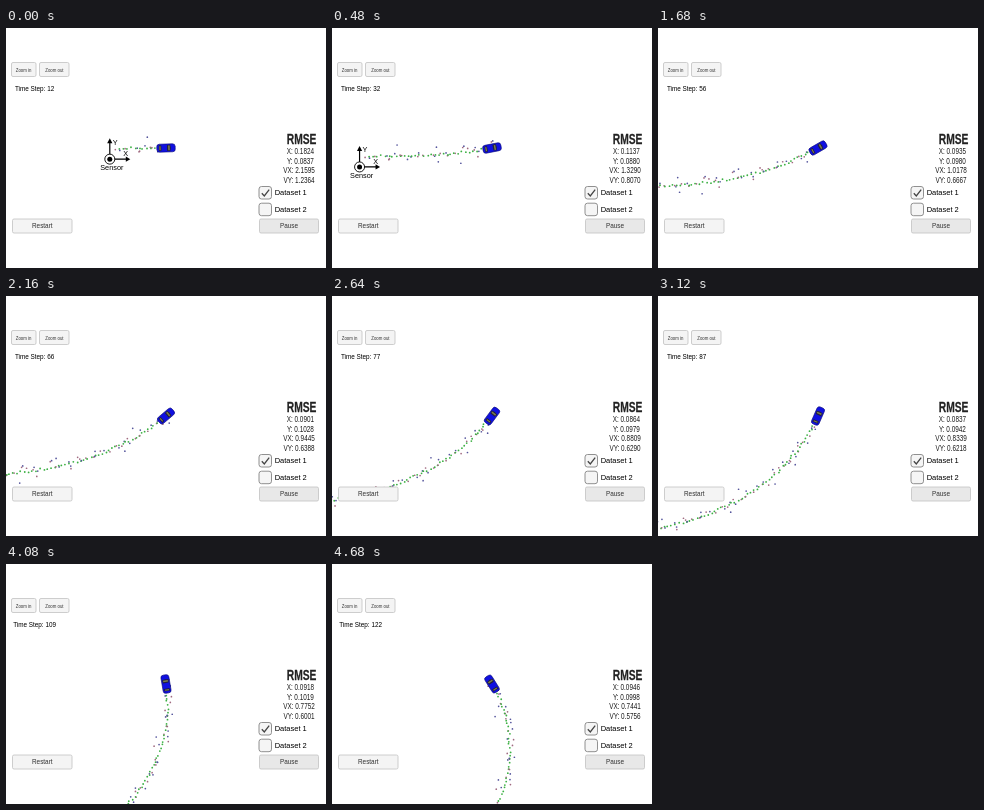
Animation of 320x240 px, one loop 4800 ms. Source, as an HTML page with a canvas:

```html
<!DOCTYPE html>
<html lang="en">
<head>
<meta charset="utf-8">
<title>Tracking simulator</title>
<style>
html, body { margin: 0; width: 100%; height: 100%; overflow: hidden; background: #fff; }
canvas, svg { position: absolute; left: 0; top: 0; width: 100vw; height: 100vh; display: block; }
text { font-family: "Liberation Sans", Arial, sans-serif; }
.mid { text-anchor: middle; }
.btn rect { fill: #f4f4f4; stroke: #c2c2c2; stroke-width: .8; }
.btn .on { fill: #e8e8e8; }
.btn text { fill: #323232; text-anchor: middle; }
.box { fill: #f5f5f5; stroke: #858585; stroke-width: .9; }
</style>
</head>
<body>
<canvas id="scene" width="320" height="240"></canvas>
<svg id="ui" viewBox="0 0 320 240">
  <g class="btn">
    <rect x="5.5" y="34.5" width="24.5" height="14" rx="1.5"/>
    <rect x="33.5" y="34.5" width="29.5" height="14" rx="1.5"/>
    <rect x="6.5" y="191" width="59.5" height="14" rx="1.5"/>
    <rect class="on" x="253.5" y="191" width="59" height="14" rx="1.5"/>
    <text transform="translate(17.6 43.8) scale(.71 1)" font-size="6.1">Zoom in</text>
    <text transform="translate(48.4 43.8) scale(.71 1)" font-size="6.1">Zoom out</text>
    <text x="36.3" y="200.4" font-size="6.4">Restart</text>
    <text x="283" y="200.4" font-size="6.4">Pause</text>
  </g>
  <text id="clock" class="mid" x="28.6" y="62.6" font-size="6.35"></text>
  <text class="mid" transform="translate(295.6 116) scale(.71 1)" font-size="14.5" font-weight="bold" fill="#222" stroke="#222" stroke-width=".25">RMSE</text>
  <g id="rows" class="mid" font-size="9" fill="#1c1c1c"></g>
  <rect class="box" x="253" y="158.5" width="12.5" height="12.5" rx="2.5"/>
  <rect class="box" x="253" y="175.2" width="12.5" height="12.5" rx="2.5"/>
  <path d="M255.8 165.2L258.3 167.9L263.2 161.6" fill="none" stroke="#444" stroke-width="1.3"/>
  <text x="268.7" y="167.3" font-size="7.5">Dataset 1</text>
  <text x="268.7" y="184" font-size="7.5">Dataset 2</text>
</svg>
<script>
const HOLD = 120, FRAMES = 40, LAST = 122, CX = 160, CY = 120;
const ctx = document.getElementById("scene").getContext("2d");
const clock = document.getElementById("clock");

// Readings at a few moments: tick, step, then the four errors
const NAMES = ["X", "Y", "VX", "VY"];
const keys = [
  [0, 12, .1824, .0837, 2.1595, 1.2364],
  [4, 32, .1137, .0880, 1.3290, .8070],
  [9, 44, .0989, .0901, 1.1368, .7121],
  [18, 66, .0901, .1028, .9445, .6388],
  [26, 87, .0837, .0942, .8339, .6218],
  [30, 99, .0893, .1037, .8031, .6222],
  [39, LAST, .0946, .0998, .7441, .5756]
];

const same = x => x;
const decay = s => 1 / Math.sqrt(s);

// Column `to` at value x of column `from`, linear in ease(x)
function read(from, to, x, ease = same) {
  const i = Math.max(1, keys.findIndex(k => k[from] >= x));
  const a = keys[i - 1], b = keys[i];
  const t = (ease(x) - ease(a[from])) / (ease(b[from]) - ease(a[from]));
  return a[to] + (b[to] - a[to]) * t;
}

// The left turn tightens with time
const heading = s => 122 * Math.pow(s / LAST, 1.8) * Math.PI / 180;

// Positions relative to the sensor, y pointing up
const path = [{ x: 9.6, y: 10.6 }];
for (let s = 0; s < LAST; s++) {
  const v = 3.9 - .003 * s, a = heading(s + .5), p = path[s];
  path.push({ x: p.x + v * Math.cos(a), y: p.y + v * Math.sin(a) });
}

let seed = 11;
const rand = () => (seed = (seed * 16807) % 2147483647) / 2147483647;
const noise = r => (rand() + rand() + rand() - 1.5) * r;

const scatter = (p, spread, color, size) =>
  ({ x: p.x + noise(spread), y: p.y + noise(spread), color, size });

// Each step leaves one estimate and one laser or radar reading
const dots = path.map((p, s) => [
  s % 2 ? scatter(p, 9, "#55559c", 1.7) : scatter(p, 5.5, "#a06a80", 1.7),
  scatter(p, 1.3, "#3cb043", 1.8)
]);

const rows = NAMES.map((name, i) => {
  const el = document.createElementNS("http://www.w3.org/2000/svg", "text");
  el.setAttribute("transform", `translate(${i < 2 ? 294.4 : 293} ${126.1 + 9.5 * i}) scale(.71 1)`);
  document.getElementById("rows").append(el);
  return el;
});

function line(...pts) {
  ctx.beginPath();
  for (let i = 0; i < pts.length; i += 2) ctx.lineTo(pts[i], pts[i + 1]);
}

function disc(x, y, r, color) {
  ctx.beginPath();
  ctx.arc(x, y, r, 0, Math.PI * 2);
  ctx.fillStyle = color;
  ctx.fill();
}

function drawSensor(x, y) {
  ctx.save();
  ctx.translate(x, y);
  ctx.fillStyle = ctx.strokeStyle = "#000";
  ctx.lineWidth = 1.2;
  line(0, -17, 0, 0, 17, 0);
  ctx.stroke();
  line(-2.6, -16, 0, -21, 2.6, -16);
  ctx.fill();
  line(16, -2.6, 20.5, 0, 16, 2.6);
  ctx.fill();
  disc(0, 0, 5, "#fff");
  ctx.lineWidth = .9;
  ctx.stroke();
  disc(0, 0, 2.5, "#000");
  ctx.font = '7.3px "Liberation Sans", Arial, sans-serif';
  ctx.textAlign = "center";
  ctx.fillText("Y", 5.3, -14.5);
  ctx.fillText("X", 16, -2.8);
  ctx.fillText("Sensor", 2, 11);
  ctx.restore();
}

function drawCar(angle) {
  ctx.save();
  ctx.translate(CX, CY);
  ctx.rotate(-angle);
  ctx.beginPath();
  ctx.roundRect(-9.2, -4, 18.4, 8, 2.6);
  ctx.fillStyle = "#1010e0";
  ctx.fill();
  ctx.strokeStyle = "#0a0a78";
  ctx.lineWidth = .6;
  ctx.stroke();
  ctx.fillStyle = "#20203c";
  line(1, -2.8, 4.2, -3.4, 4.9, 0, 4.2, 3.4, 1, 2.8);
  ctx.fill();
  line(-4.6, -2.7, -7.2, -3, -7.2, 3, -4.6, 2.7);
  ctx.fill();
  ctx.fillStyle = "#7c7c50";
  ctx.fillRect(2.2, -2.4, 1.5, 4.8);
  ctx.fillRect(-6.6, -2, 1.2, 4);
  ctx.restore();
}

function draw(now) {
  const tick = Math.floor(now / HOLD) % FRAMES;
  const step = Math.round(read(0, 1, tick));
  const car = path[step];
  const sx = x => CX + x - car.x, sy = y => CY - y + car.y;

  ctx.clearRect(0, 0, 320, 240);
  drawSensor(sx(0), sy(0));
  for (const d of dots.slice(0, step + 1).flat()) disc(sx(d.x), sy(d.y), d.size / 2, d.color);
  drawCar(heading(step));

  clock.textContent = "Time Step: " + step;
  rows.forEach((el, i) => {
    el.textContent = NAMES[i] + ": " + read(1, i + 2, step, decay).toFixed(4);
  });
}

const start = performance.now();
function loop() {
  draw(performance.now() - start);
  requestAnimationFrame(loop);
}
loop();
</script>
</body>
</html>
```
